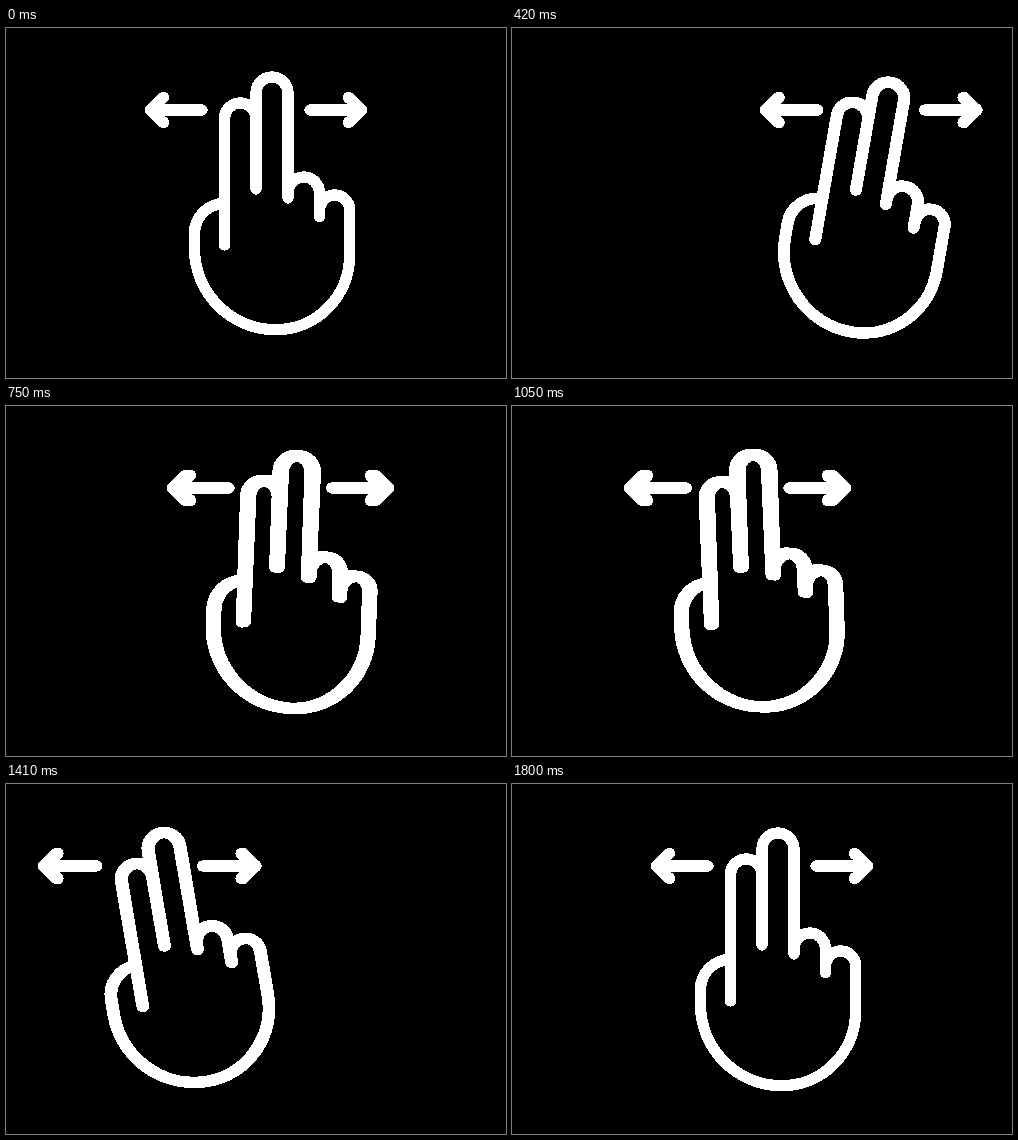
Animation, 500 px wide and 350 px high, one loop 1830 ms. Source, as an HTML page:

```html
<!DOCTYPE html>
<html lang="en">
<head>
<meta charset="utf-8">
<title>Two-finger swipe</title>
<style>
  html, body { margin: 0; width: 100%; height: 100%; overflow: hidden; background: #000; }
  svg {
    display: block; fill: none; stroke: #fff; stroke-width: 11.4;
    stroke-linecap: round; stroke-linejoin: round; shape-rendering: crispEdges;
  }
</style>
</head>
<body>
<svg id="stage" width="500" height="350" viewBox="0 0 500 350">
  <defs>
    <path id="hand" d="
      M218.5 217 V90.5 A15.75 15.5 0 0 1 250 90.5
      M250 161 V65 A16 16 0 0 1 282 65 V170
      M282 165 A15.75 16 0 0 1 313.5 165 V188.5
      M313.5 182 A15.1 15 0 0 1 343.7 182 V227
      A73.7 74.7 0 0 1 270 301.7 A81.5 81.5 0 0 1 188.5 220.2
      V205.5 A30 30 0 0 1 218.5 175.5"/>
    <path id="arrows" d="
      M196 82 H144.5 M157.5 69.5 L144.5 82 L157.5 94.5
      M304 82 H355.5 M342.5 69.5 L355.5 82 L342.5 94.5"/>
  </defs>
</svg>
<script>
const stage = document.getElementById("stage");
const LOOP = 1830, STEP = 30, QUARTER = 450, SHUTTER = 15, SAMPLES = 6;

function copyOf(id) {
  const use = document.createElementNS("http://www.w3.org/2000/svg", "use");
  use.setAttribute("href", "#" + id);
  return stage.appendChild(use);
}
const poses = Array.from({ length: SAMPLES }, () => ({
  hand: copyOf("hand"), arrows: copyOf("arrows")
}));

// Symmetric ease: cubic-bezier(.45, 0, .55, 1)
function ease(x) {
  let lo = 0, hi = 1;
  for (let i = 0; i < 24; i++) {
    const s = (lo + hi) / 2, r = 1 - s;
    if (1.35 * s * r * r + 1.65 * s * s * r + s * s * s < x) lo = s;
    else hi = s;
  }
  return lo * lo * (3 - 2 * lo);
}

// Swing through 0, 1, 0, -1, 0
function swing(t) {
  if (t <= 0 || t >= 4 * QUARTER) return 0;
  const stops = [0, 1, 0, -1, 0];
  const i = Math.floor(t / QUARTER);
  return stops[i] + (stops[i + 1] - stops[i]) * ease(t / QUARTER - i);
}

function draw(t) {
  const resting = t === 0 || t >= 4 * QUARTER;
  // Spread the copies over the shutter time, which broadens fast strokes
  poses.forEach(({ hand, arrows }, i) => {
    const e = resting ? 0 : swing(t + SHUTTER * (i / (SAMPLES - 1) - 0.5));
    arrows.setAttribute("transform", `translate(${110 * e})`);
    hand.setAttribute("transform", `translate(${83.7 * e}) rotate(${10 * e} 250 224)`);
  });
}

const start = performance.now();
function tick() {
  const t = (performance.now() - start) % LOOP;
  draw(Math.floor(t / STEP) * STEP);
  requestAnimationFrame(tick);
}
tick();
</script>
</body>
</html>
```
